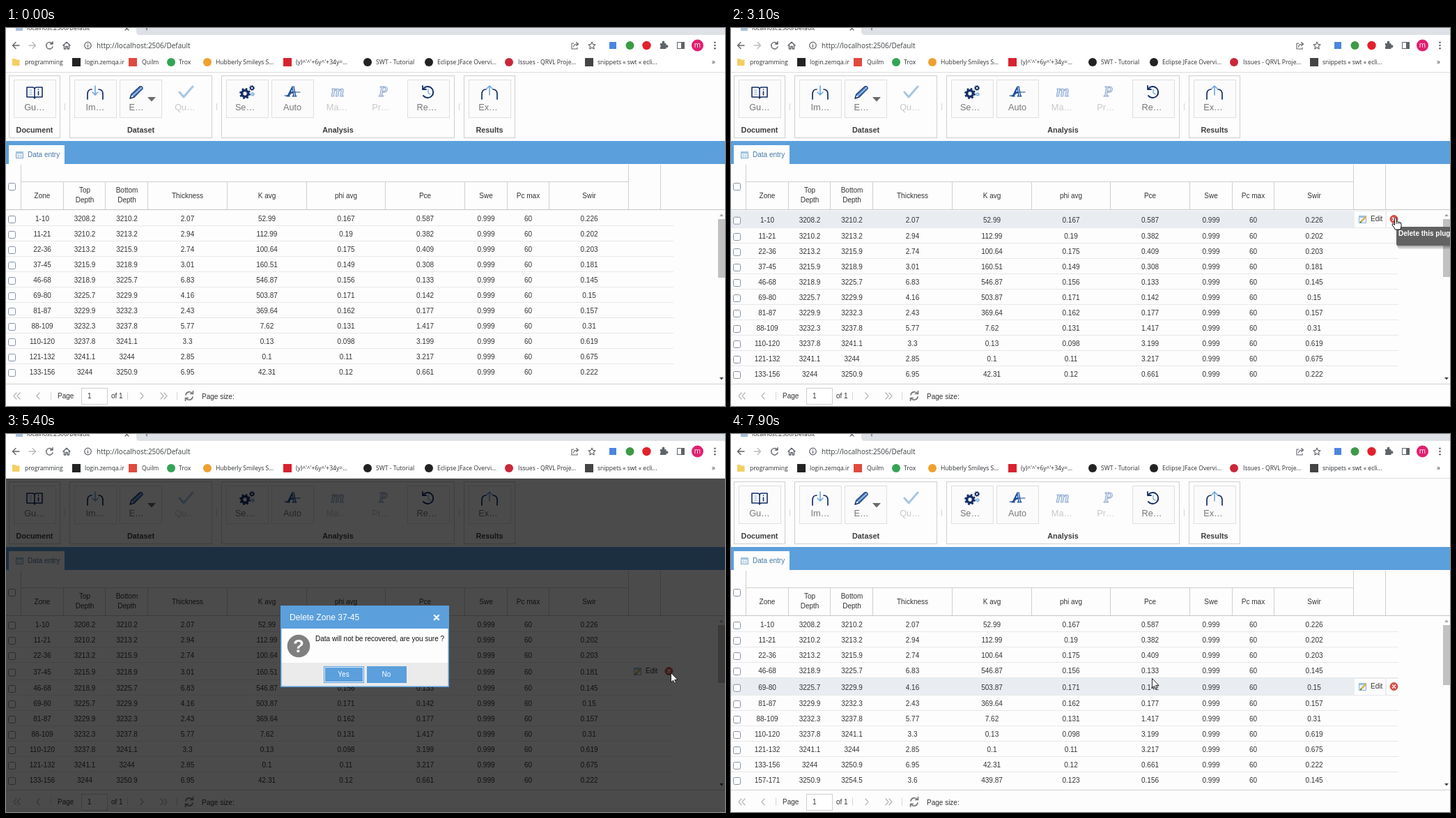
Animation, 1032 px wide and 542 px high, one loop 8 s. Source, as an HTML page:

```html
<!DOCTYPE html>
<html lang="en">
<head>
<meta charset="utf-8">
<title>Data entry</title>
<style>
html, body { margin: 0; width: 100%; height: 100%; overflow: hidden; background: #fdfdfd; }
svg { display: block; width: 100%; height: 100%; }
text { font: 10px "Liberation Sans", Arial, sans-serif; fill: #333; white-space: pre; }
.url { font: 10px "Open Sans", "Noto Sans", sans-serif; fill: #3c4043; }
.mark { font: 8.6px "Open Sans", "Noto Sans", sans-serif; fill: #2c2f33; }
.tool { font-size: 12.7px; fill: #777; }
.off { fill: #c8c8c8; }
.group { font-size: 10.8px; font-weight: bold; fill: #3c3c3c; }
.script { font: italic bold 20px "Liberation Serif", serif; fill: #a8cdf0; stroke: #1d4c94; stroke-width: 1.1; }
.line { fill: none; stroke-linecap: round; stroke-linejoin: round; }
</style>
</head>
<body>
<svg id="stage" viewBox="0 0 1032 542" xmlns="http://www.w3.org/2000/svg"></svg>
<script>
const LOOP = 8000;
const NAVY = '#152f66', SKY = '#6fa6dc', BLUE = '#5b9fdc';
const svg = document.getElementById('stage');

const rect = (x, y, w, h, fill, more = '') =>
  `<rect x="${x}" y="${y}" width="${w}" height="${h}" fill="${fill}" ${more}/>`;
const frame = (x, y, w, h, stroke, fill = 'none', r = 0) =>
  rect(x + .5, y + .5, w - 1, h - 1, fill, `stroke="${stroke}" rx="${r}"`);
const dot = (x, y, r, fill, more = '') => `<circle cx="${x}" cy="${y}" r="${r}" fill="${fill}" ${more}/>`;
const path = (d, stroke, w = 1.4, x = 0, y = 0) =>
  `<path class="line" d="${d}" stroke="${stroke}" stroke-width="${w}" transform="translate(${x} ${y})"/>`;
const solid = (d, fill) => `<path d="${d}" fill="${fill}"/>`;
const label = (x, y, s, cls = '', more = '') => `<text x="${x}" y="${y}" class="${cls}" ${more}>${s}</text>`;
const mid = (x, y, s, cls = '', more = '') => label(x, y, s, cls, `text-anchor="middle" ${more}`);
const hline = (x1, x2, y, c) => rect(x1, y, x2 - x1, 1, c);
const vline = (x, y1, y2, c) => rect(x, y1, 1, y2 - y1, c);
const check = y => frame(3, y, 11, 11, '#8493a4', '#fff', 2);

function browser() {
  const ink = '#5f6368', squares = [[101, '#222'], [182, '#e04a3f'], [404, '#d8232e'], [837, '#444']],
    rounds = [[237, '#35a457'], [289, '#eda12f'], [519, '#222'], [607, '#222'], [722, '#c9283a']];
  const marks = [[27, 'programming'], [113, 'login.zemqa.ir'], [195, 'Quilm'], [248, 'Trox'],
    [301, 'Hubberly Smileys S...'], [416, "(y)^'^'+6y^'+34y=..."], [531, 'SWT - Tutorial'],
    [619, 'Eclipse JFace Overvi...'], [735, 'Issues - QRVL Proje...'], [849, 'snippets « swt « ecli...']];
  return rect(0, 0, 1032, 64, '#fff') + rect(187, 0, 845, 10, '#dee1e6') +
    solid('M187 0V5Q187 10 192 10H187Z', '#fff') +
    label(30, 3, 'localhost:2506/Default', 'mark') + rect(14, 0, 10, 4, '#a9bfd8') +
    path('M171 -2L176 3M176 -2L171 3', ink, 1.2) + path('M202 -3V3', ink, 1.2) +
    path('M19 25H10M14 20.5L9.5 25L14 29.5', ink) +
    path('M33 25H42M38 20.5L42.5 25L38 29.5', '#b9bbbe') +
    path('M66.5 22.5A4.8 4.8 0 1 0 67 27M67 19.5V23H63.5', ink) +
    path('M82 25L87 20.2L92 25M83.5 24.5V30H85.8V26.5H88.2V30H90.5V24.5', ink) +
    dot(117.5, 25, 4.8, 'none', `stroke="${ink}" stroke-width="1.2"`) +
    path('M117.5 24.7V27.5M117.5 22.6V22.7', ink, 1.2) +
    label(130, 29, 'http://localhost:2506/Default', 'url') +
    path('M815 22H812V30H820V28M814.5 27Q815 23 821 23M818.5 20.5L821.5 23L818.5 25.5', ink, 1.1) +
    path('M841 20L842.5 23.4L846 23.8L843.4 26.2L844.2 30L841 28L837.8 30L838.6 26.2L836 23.8L839.5 23.4Z', ink, 1.1) +
    rect(866, 20, 10, 10, '#4a86e0') + dot(895.5, 25, 6, '#3d9a45') + dot(919.5, 25, 6.2, '#e3202b') +
    solid('M939 22H942A2 2 0 1 1 945 22H947.5V24.5A2 2 0 1 1 947.5 28V30H939V27.5A2 2 0 0 0 939 24.5Z', ink) +
    frame(963, 20, 11, 10, ink) + rect(969, 20, 5, 10, ink) +
    dot(992.5, 25, 8.5, '#e0206f') + mid(992.5, 28, 'm', 'url', 'style="fill:#fff"') +
    [20.7, 25, 29.3].map(y => dot(1017.5, y, 1.3, ink)).join('') +
    solid('M9 44H13L14.5 45.5H19.5V54H9Z', '#f3cf62') +
    squares.map(([x, c]) => rect(x - 6, 43, 12, 12, c)).join('') +
    rounds.map(([x, c]) => dot(x, 49, 6, c)).join('') +
    marks.map(([x, s]) => label(x, 52, s, 'mark')).join('') +
    label(1013, 52, '»', 'url') + hline(0, 1032, 63, '#dcdcdc');
}

function gear(x, y, r, c) {
  const ring = (rr, w, more = '') => dot(x, y, rr, 'none', `stroke="${c}" stroke-width="${w}" ${more}`);
  const step = 2 * Math.PI * r / 16;
  return ring(r * .68, r * .55) + ring(r, r * .45, `stroke-dasharray="${step}"`);
}

function toolbar() {
  const tray = (c, tip) => path('M-11 10V3Q-11 -4 -5 -4M5 -4Q11 -4 11 3V10', NAVY, 1.7) + path(tip, c, 1.6);
  const at = (x, s) => `<g transform="translate(${x} 92)">${s}</g>`;
  const groups = [[4, 74, 'Document'], [91, 205, 'Dataset'], [309, 335, 'Analysis'], [657, 74, 'Results']];
  const buttons = [[11, 'Gu…'], [98, 'Im…'], [163, 'E…', -6], [316, 'Se…', -3], [381, 'Auto'], [576, 'Re…', -2], [664, 'Ex…', -2]];
  const disabled = [[257, 'Qu…'], [475, 'Ma…'], [538, 'Pr…']];
  return rect(0, 64, 1032, 98, '#fdfdfd') +
    groups.map(([x, w, s]) => frame(x, 68, w, 90, '#cfcfcf') + mid(x + w / 2, 150, s, 'group')).join('') +
    [84, 302, 650].map(x => vline(x, 108, 118, '#d5d5d5')).join('') +
    buttons.map(([x, s, dx = 0]) => frame(x, 74, 61, 55, '#dfdfdf', '#fbfbfc') + mid(x + 30 + dx, 118, s, 'tool')).join('') +
    disabled.map(([x, s]) => mid(x, 118, s, 'tool off')).join('') +
    at(41, path('M-11 -7H-3Q0 -7 0 -4Q0 -7 3 -7H11V7H3Q0 7 0 9Q0 7 -3 7H-11ZM0 -4V8', NAVY, 1.6) +
      path('M-7 -3H-4M-7 0H-4M-7 3H-4', SKY, 1) + path('M5.5 -1V4M5.5 -4V-3.8', NAVY, 1.6)) +
    at(128, tray(SKY, 'M0 -9V4M-4 0L0 4L4 0')) +
    at(187, path('M-9 9L-7 3L5 -8Q9 -9 9 -5L-3 7Z', NAVY, 1.5) + path('M-6 4L6 -7M-4 6L8 -5', '#3f74bb', 2)) +
    solid('M203 99H215L209 105.5Z', '#6a6a6a') +
    at(258, path('M-9 0L-3 7L10 -8', '#a9c6e5', 3)) +
    gear(343, 94, 6.5, NAVY) + gear(353, 86, 3.2, NAVY) + gear(354, 95, 2.3, SKY) +
    mid(411, 98, 'A', 'script') + path('M400 97Q407 98 410 92H422', '#1d4c94', 1.2) +
    mid(476, 98, 'm', 'script', 'opacity=".45" style="font-size:24px"') + mid(541, 98, 'P', 'script', 'opacity=".45"') +
    at(606, path('M-7 -5A8 8 0 1 1 -7 5', NAVY, 2) + path('M-8 -9V-4H-3', NAVY, 1.8) + path('M0 -4V1L3 3', SKY, 1.3)) +
    at(694, tray(SKY, 'M0 4V-9M-4 -5L0 -9L4 -5')) +
    rect(0, 162, 1032, 33, BLUE) + rect(4, 168, 80, 28, '#fdfdfd') +
    frame(14, 177, 11, 10, '#7ba7ce', '#e9f2fa') + rect(14, 177, 11, 3, '#9fc3e2') +
    path('M14 183.5H25M17.5 180V187M21.5 180V187', '#b6d0e6', .8) +
    label(31, 185, 'Data entry', '', 'style="fill:#4478a8"');
}

const COLS = [52, 113, 173.5, 260.5, 374.5, 488, 601.5, 689, 749.5, 837];

function header() {
  const c = '#cfcfcf';
  const names = ['Zone', 'Top|Depth', 'Bottom|Depth', 'Thickness', 'K avg', 'phi avg', 'Pce', 'Swe', 'Pc max', 'Swir'];
  return rect(0, 195, 1032, 67, '#fdfdfd') + hline(22, 893, 220, c) + hline(0, 1032, 260, '#c6c6c6') +
    [21, 893, 939].map(x => vline(x, 196, 260, c)).join('') +
    [82, 142, 203, 317, 431, 544, 658, 719, 779].map(x => vline(x, 220, 260, c)).join('') + check(222) +
    names.map((n, i) => {
      const [a, b] = n.split('|');
      return b ? mid(COLS[i], 236, a) + mid(COLS[i], 250, b) : mid(COLS[i], 243.5, a);
    }).join('');
}

// zone, top depth, thickness, K, phi, Pce, Swir
const DATA = `1-10 3208.2 2.07 52.99 0.167 0.587 0.226
11-21 3210.2 2.94 112.99 0.19 0.382 0.202
22-36 3213.2 2.74 100.64 0.175 0.409 0.203
37-45 3215.9 3.01 160.51 0.149 0.308 0.181
46-68 3218.9 6.83 546.87 0.156 0.133 0.145
69-80 3225.7 4.16 503.87 0.171 0.142 0.15
81-87 3229.9 2.43 369.64 0.162 0.177 0.157
88-109 3232.3 5.77 7.62 0.131 1.417 0.31
110-120 3237.8 3.3 0.13 0.098 3.199 0.619
121-132 3241.1 2.85 0.1 0.11 3.217 0.675
133-156 3244 6.95 42.31 0.12 0.661 0.222
157-171 3250.9 3.6 439.87 0.123 0.156 0.145`.split('\n').map(r => r.split(' '));

function row([zone, top, thick, k, phi, pce, swir], i) {
  const bottom = DATA[i + 1] ? DATA[i + 1][1] : '3254.5';
  const cells = [zone, top, bottom, thick, k, phi, pce, '0.999', '60', swir];
  return `<g class="row"><rect width="958" height="21" fill="#e9edf2"/><rect width="958" height="1" fill="#e8e8e8"/>` +
    `<g>${check(7)}${cells.map((s, j) => mid(COLS[j], 15.3, s)).join('')}</g></g>`;
}

function footer() {
  const c = '#b4b4b4';
  return rect(0, 503, 1032, 39, '#fdfdfd') + hline(0, 1032, 510, '#d2d2d2') +
    path('M15 523L11 527.5L15 532M20 523L16 527.5L20 532M48 523L44 527.5L48 532M193 523L197 527.5L193 532M222 523L226 527.5L222 532M227 523L231 527.5L227 532', c, 1.2) +
    [64, 174, 245].map(x => vline(x, 522, 533, '#d5d5d5')).join('') +
    label(74, 531, 'Page') + frame(108, 516, 38, 24, '#cfcfcf', '#fff') + label(117, 531, '1') + label(151, 531, 'of 1') +
    path('M258 526A5.3 5.3 0 0 1 267.5 524M268.5 520.5V524.5H264.5M268 529A5.3 5.3 0 0 1 258.5 531M257.5 534.5V530.5H261.5', '#777', 1.6) +
    label(281, 532, 'Page size:');
}

const actions = `<g id="actions">${rect(895, 1, 44, 23, '#fdfdfd')}${rect(941, 1, 17, 23, '#fdfdfd')}
  ${frame(901, 7, 11, 11, '#8fb3cf', '#e6f1f8')}${rect(901, 7, 11, 3, '#9cc3df')}
  ${path('M904 16L911 9', '#e2ad3f', 2.2)}${path('M903.5 17L904.5 15.5', '#4b8a3c', 1.5)}
  ${label(918, 15, 'Edit')}${dot(951.5, 12, 5.5, '#d9534b', 'stroke="#b8403a" stroke-width=".8"')}
  ${path('M949.5 10L953.5 14M953.5 10L949.5 14', '#fff', 1.5)}</g>`;

const dialog = `<g id="modal">${rect(0, 64, 1032, 478, '#000', 'opacity=".7"')}
  ${rect(394, 246, 242, 117, BLUE)}${rect(395.5, 279, 239, 49, '#fdfdfd')}${rect(395.5, 328, 239, 33.5, '#ebebeb')}
  ${label(407, 267, 'Delete Zone 37-45', '', 'style="font-size:12.1px;fill:#fff"')}
  ${path('M614.8 260L621 266.2M621 260L614.8 266.2', '#fff', 2.4)}
  ${dot(420, 304, 16.3, '#7f7f7f')}${mid(420, 313, '?', '', 'style="font-size:26px;font-weight:bold;fill:#fff"')}
  ${label(444, 297, 'Data will not be recovered, are you sure ?', '', 'style="fill:#111"')}
  ${rect(456, 333, 58, 24, BLUE)}${frame(457, 334, 56, 22, '#e4f0fa')}${rect(518, 333, 57, 24, BLUE)}
  ${mid(484.5, 348, 'Yes', '', 'style="fill:#fff"')}${mid(546, 348, 'No', '', 'style="fill:#fff"')}</g>`;

const pointer = `<g id="arrow"><path d="M.5 .5V14L3.6 11.2L5.6 15.4L7.6 14.5L5.7 10.4H10Z" fill="#fff" stroke="#111" stroke-width=".9"/></g>
  <g id="hand"><path d="M-1.5 .8Q0 -.8 1.2 .8V6Q2.5 5 3.6 6.4Q5 5.6 6 7Q7.6 6.6 8 8.4V12Q8 14 6.5 17H-.8Q-1.5 14.5 -4 12Q-5.5 9.5 -4.6 8.8Q-3.2 8.2 -1.5 10.4Z" fill="#fff" stroke="#111"/>
  <path d="M1.2 6V9M3.6 6.5V9M6 7V9" stroke="#111" stroke-width=".8"/></g>`;

svg.innerHTML = `<defs><clipPath id="grid">${rect(0, 261, 1032, 243, '#000')}</clipPath></defs>` +
  rect(0, 0, 1032, 542, '#fdfdfd') + browser() + toolbar() +
  `<g clip-path="url(#grid)">${DATA.map(row).join('')}${actions}</g>` + header() + footer() +
  solid('M1024 270L1027 266.5L1030 270Z', '#a5a5a5') + solid('M1024 501L1030 501L1027 504.5Z', '#444') +
  rect(1022, 274, 10, 84, '#c1c1c1', 'id="thumb"') + dialog +
  `<g id="tip">${rect(2, 2, 90, 30, '#000', 'opacity=".12" rx="3"')}${rect(1, 1, 90, 28.5, '#000', 'opacity=".2" rx="2"')}
   ${rect(0, 0, 90, 27, '#626262', 'rx="2"')}${label(3, 12.5, 'Delete this plug', '', 'style="font-weight:bold;fill:#fff"')}</g>` + pointer;

// each run: start time, then pointer positions 100 ms apart
const RUNS = [
  [200, 700, 10, 726, 60, 750, 115, 766, 170, 768, 218, 748, 247],
  [900, 747, 247],
  [1100, 760, 240, 800, 220, 850, 268, 882, 309, 901, 286],
  [1700, 904, 282, 930, 182, 940, 514, 930, 275, 955, 266],
  [2300, 962, 270, 962, 273, 957, 273, 954, 272],
  [3500, 953, 296, 950, 317, 948, 334, 947, 337],
  [4000, 944, 359, 940, 331, 938, 270, 942, 292, 947, 318],
  [4600, 951, 339],
  [5300, 954, 342],
  [6600, 485, 336],
  [7100, 486, 336],
  [7300, 492, 343, 508, 352, 530, 361, 556, 364, 580, 360, 597, 353, 604, 350]
];
const moves = RUNS.flatMap(([t, ...p]) =>
  Array.from({ length: p.length / 2 }, (_, i) => [t + i * 100, p[2 * i], p[2 * i + 1]]));
for (let i = 1; i <= 9; i++) {
  const p = i / 9, e = p * p * (3 - 2 * p);
  moves.push([5600 + i * 100, Math.round(954 - 469 * e), Math.round(342 - 6 * e + 8 * Math.sin(Math.PI * p))]);
}
moves.sort((a, b) => a[0] - b[0]);

// time, expanded row
const OPEN = [[0, -1], [2000, 0], [3800, 3], [4200, 0], [4400, 2], [4600, 3], [6600, -1], [6800, 3], [7600, 4]];

const $ = id => document.getElementById(id);
const last = (list, t) => list.filter(s => s[0] <= t).pop();
const within = (t, a, b) => t >= a && t < b;
const show = (el, on) => el.setAttribute('display', on ? 'inline' : 'none');
const place = (el, x, y) => el.setAttribute('transform', `translate(${x} ${y})`);
const rows = [...document.querySelectorAll('.row')];

function draw(t) {
  const [, x, y] = last(moves, t) || [0, -99, -99];
  const open = last(OPEN, t)[1];
  const modal = within(t, 5300, 6600), gone = t >= 6600;
  const hand = within(t, 2500, 3800) || within(t, 4600, 5300);
  const tip = within(t, 3100, 3500) || within(t, 4800, 5000);
  let top = 262, n = 0;
  rows.forEach((el, i) => {
    const hidden = gone && i === 3;
    show(el, !hidden);
    if (hidden) return;
    const big = n++ === open, h = big ? 25 : 22;
    const [back, rule, cells] = el.children;
    place(el, 0, top);
    back.setAttribute('height', h - 1);
    show(back, !modal && x < 958 && within(y + 3, top, top + h));
    rule.setAttribute('y', h - 1);
    place(cells, 0, big ? 1.7 : 0);
    if (big) place($('actions'), 0, top);
    top += h;
  });
  show($('actions'), open >= 0);
  $('thumb').setAttribute('height', 84 + (gone ? 3 : 0) - (open >= 0 ? 1 : 0));
  show($('modal'), modal);
  show($('tip'), tip);
  place($('tip'), x + 1, y + 13);
  show($('arrow'), !hand);
  show($('hand'), hand);
  place($('arrow'), x, y);
  place($('hand'), x, y);
}

const start = performance.now();
function tick() {
  draw((performance.now() - start) % LOOP);
  requestAnimationFrame(tick);
}
tick();
</script>
</body>
</html>
```
